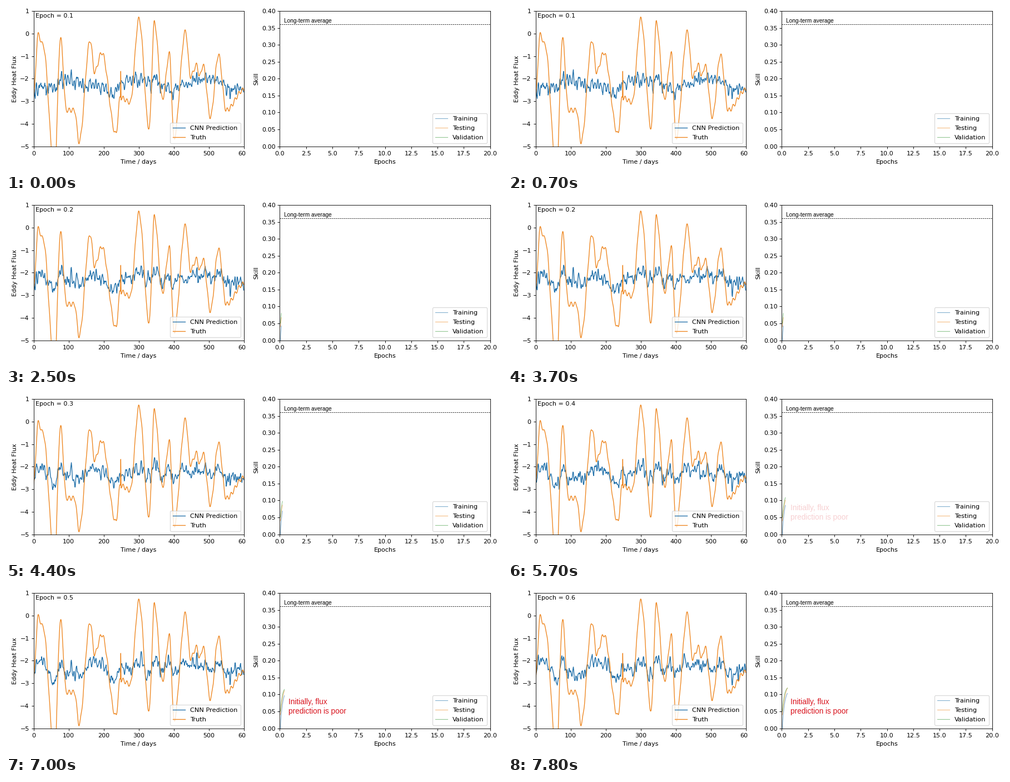
Animation of 892x300 px, one loop 8000 ms. Source, as a matplotlib script:

```python
import numpy as np
import matplotlib.pyplot as plt
from matplotlib.animation import FuncAnimation
from matplotlib.patches import Rectangle

W, H = 892, 300
STEP, FRAMES = 100, 80
BLUE, ORANGE, GREEN, RED = "#1f6fa9", "#ee861f", "#3c9a3c", "#d9141e"
plt.rcParams.update({"font.family": "DejaVu Sans", "xtick.major.pad": 4.3,
                     "legend.fontsize": 10.2, "legend.borderpad": .45,
                     "legend.labelspacing": .6, "legend.loc": "lower right"})

# Main turning points of the true flux: (day, value)
TURNS = [
    (0, -2.8), (13, -.05), (27, -.5), (60, -6.1), (77, -.2), (94, -3.4),
    (117, -3.4), (130, -4.8), (162, -.3), (174, -1.7), (195, -.85),
    (235, -4.45), (248, -2.8), (249, -1.6), (250, -2.85), (276, -3.05),
    (301, .65), (330, -4.2), (345, .5), (368, -2.9), (388, -.9),
    (401, -4.65), (434, .1), (448, -1.9), (466, -1.4), (474, -1.9),
    (484, -1.4), (505, -3.7), (528, -.95), (550, -3.4), (600, -2.5),
]
EPOCH_STARTS = [0, 2500, 4400, 5600, 6500, 7400]

# Name: colour, first skill, total gain, rise time in epochs
SKILL = {
    "Training": (BLUE, 0, .115, .22),
    "Testing": (ORANGE, .04, .1, .32),
    "Validation": (GREEN, .05, .075, .2),
}

days = np.arange(601)


def smooth(u):
    u = np.clip(u, 0, 1)
    return u * u * (3 - 2 * u)


def wave(x, points):
    """Join points with half cosine waves."""
    px, py = np.array(points).T
    i = np.clip(np.searchsorted(px, x, side="right") - 1, 0, len(px) - 2)
    u = (x - px[i]) / (px[i + 1] - px[i])
    return py[i] + (py[i + 1] - py[i]) * (1 - np.cos(np.pi * u)) / 2


def jitter(seed):
    noise = np.random.default_rng(seed).normal(size=days.size + 3)
    return np.convolve(noise, [.2, .3, .3, .2], "valid")


truth = wave(days, TURNS) + .1 * np.sin(2 * np.pi * days / 11)
signal = np.convolve(np.tanh((truth + 2.2) / 2), np.ones(13) / 13, "same")


def predict(k):
    """A slow drift that gives way to a damped copy of the truth."""
    learnt = 1 - np.exp(-k / 1.5)
    drift = -.25 * (1 - learnt) * np.cos(2 * np.pi * days / 200)
    trend = -2.25 - .1 * learnt + drift + (.15 + .3 * learnt) * signal
    return trend + .28 * jitter(3) + .2 * jitter(20 + k)


def add_axes(left, right, top=9, bottom=253.5):
    return fig.add_axes([left / W, 1 - bottom / H,
                         (right - left) / W, (bottom - top) / H])


def label(x, y, text, **kw):
    return fig.text(x / W, 1 - y / H, text, va="baseline", zorder=5, **kw)


fig = plt.figure(figsize=(11.15, 3.75), dpi=80, facecolor="white")

flux = add_axes(49.5, 427.5)
flux.set(xlim=(0, 600), ylim=(-5, 1), yticks=range(-5, 2),
         xlabel="Time / days", ylabel="Eddy Heat Flux")
predictions = [predict(k) for k in range(len(EPOCH_STARTS))]
pred_line, = flux.plot(days, predictions[0], color=BLUE, lw=1.2,
                       label="CNN Prediction")
flux.plot(days, truth, color=ORANGE, lw=1.2, label="Truth")
flux.legend()
# The panel is cropped just past its right edge
fig.add_artist(Rectangle((430.5 / W, 22 / H), 12 / W, 22 / H,
                         fc="white", ec="none", zorder=4))

skill = add_axes(492.5, 870.5)
skill.set(xlim=(0, 20), ylim=(0, .4), xticks=np.arange(0, 20.1, 2.5),
          yticks=np.arange(0, .41, .05), xlabel="Epochs", ylabel="Skill")
skill.axhline(.36, color="black", lw=.7, ls=(0, (3, 1.6)))
skill_lines = [skill.plot([], [], color=c, lw=1, alpha=.55, label=name)[0]
               for name, (c, *_) in SKILL.items()]
skill.legend()

epoch_text = label(53, 21, "")
label(500, 29.5, "Long-term average", family="Liberation Sans", size=9.15)
note = [label(508, y, s, family="Liberation Sans", size=12.3, color=RED)
        for y, s in ((210, "Initially, flux"), (226.5, "prediction is poor"))]


def update(i):
    t = i * STEP
    k = sum(t >= s for s in EPOCH_STARTS) - 1
    pred_line.set_ydata(predictions[k])
    epoch_text.set_text(f"Epoch = {(k + 1) / 10:.1f}")
    e = np.linspace(0, k / 10, 20 if k else 0)
    for line, (_, start, gain, rise) in zip(skill_lines, SKILL.values()):
        line.set_data(.05 + .95 * e, start + gain * (1 - np.exp(-e / rise)))
    for text in note:
        text.set_alpha(float(smooth((t - 5500) / 700)))
    return [pred_line, epoch_text, *skill_lines, *note]


anim = FuncAnimation(fig, update, frames=FRAMES, interval=STEP,
                     repeat=True, repeat_delay=0, blit=False)
plt.show()
```
